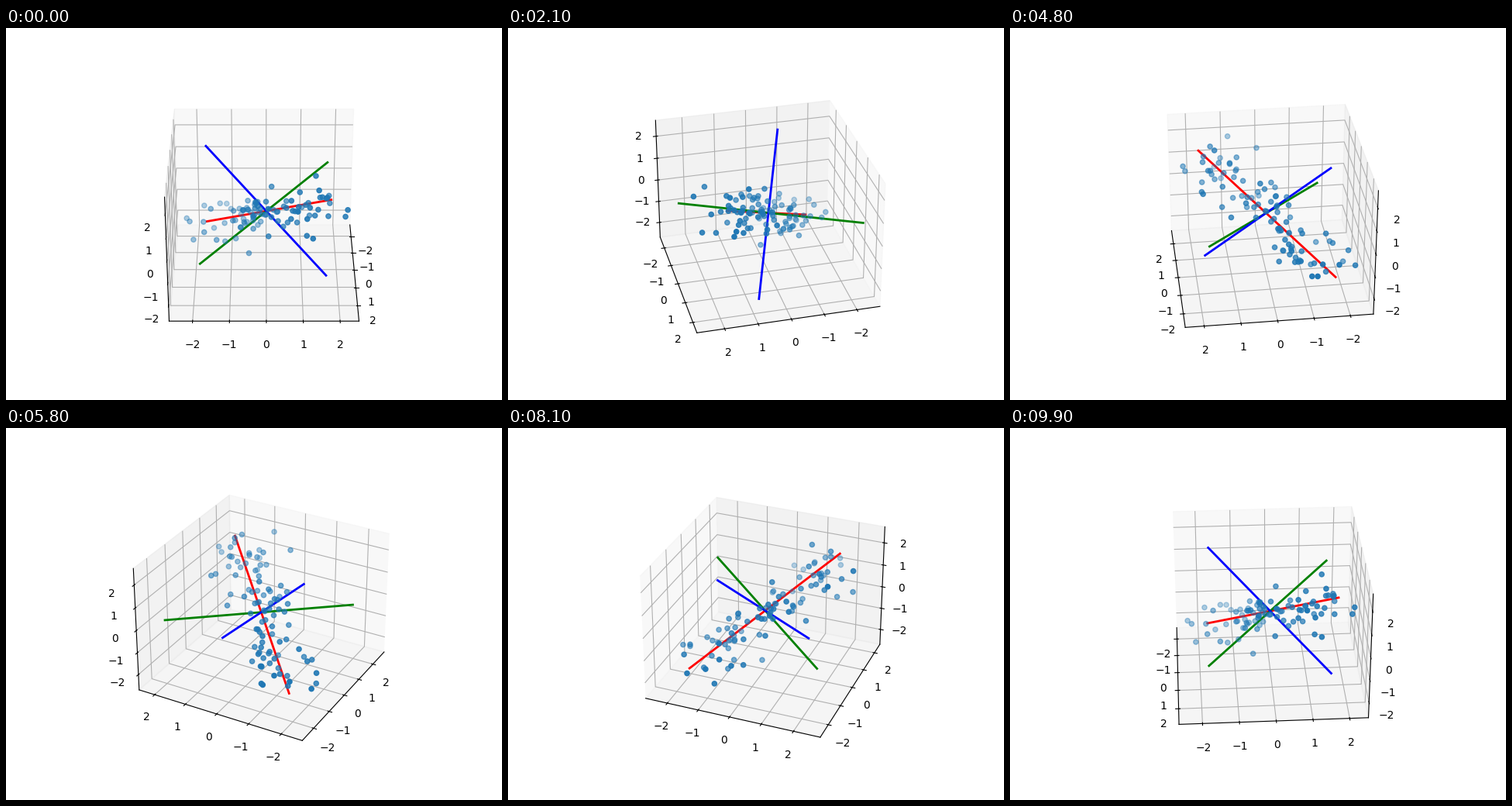
Write a matplotlib script that moves like this. It is 640 px wide and 480 px high and loops after 10 s.

```python
import numpy as np
import matplotlib.pyplot as plt
from matplotlib.animation import FuncAnimation

FRAMES = 100
COUNT = 88
LIMITS = {"xlim": (-2.71, 2.82), "ylim": (-2.636, 2.512), "zlim": (-2.712, 2.712)}

# Principal axes of the cloud.
first = np.array([0.565, 0.577, 0.589])
second = np.array([-0.786, 0.594, 0.172])
basis = np.array([first, second, np.cross(first, second)])

# An even spread along the first axis, with noise across it.
rng = np.random.default_rng(7)
along = rng.uniform(-2.75, 2.75, COUNT)
across = np.clip(rng.normal(size=(COUNT, 2)), -2, 2) * (0.5, 0.42)
cloud = np.column_stack([along, across]) @ basis

# The outermost points give the cloud its outline.
outline = [
    (2.45, 0.83, 1.82), (1.95, 0.05, 1.56), (1.87, 1.09, 0.33),
    (1.54, 2.19, 1.21), (1.52, 1.41, 2.04), (0.11, -0.49, -1.85),
    (-1.49, -2.31, -1.46), (-2.17, -1.16, -1.28),
]
points = np.vstack([cloud, outline])

fig = plt.figure(figsize=(6.4, 4.8), dpi=100)
ax = fig.add_subplot(projection="3d")
ax.scatter(*points.T)
for vec, color in zip(basis, ("red", "green", "blue")):
    ax.plot(*np.transpose([-3 * vec, 3 * vec]), color=color, lw=2)
ax.set(**LIMITS)


def update(i):
    # The tiny offset settles which side wall shows when seen head-on.
    ax.view_init(elev=30, azim=360 * i / FRAMES + 1e-3)
    return []


anim = FuncAnimation(fig, update, frames=FRAMES, interval=100, repeat=True)
plt.show()
```
